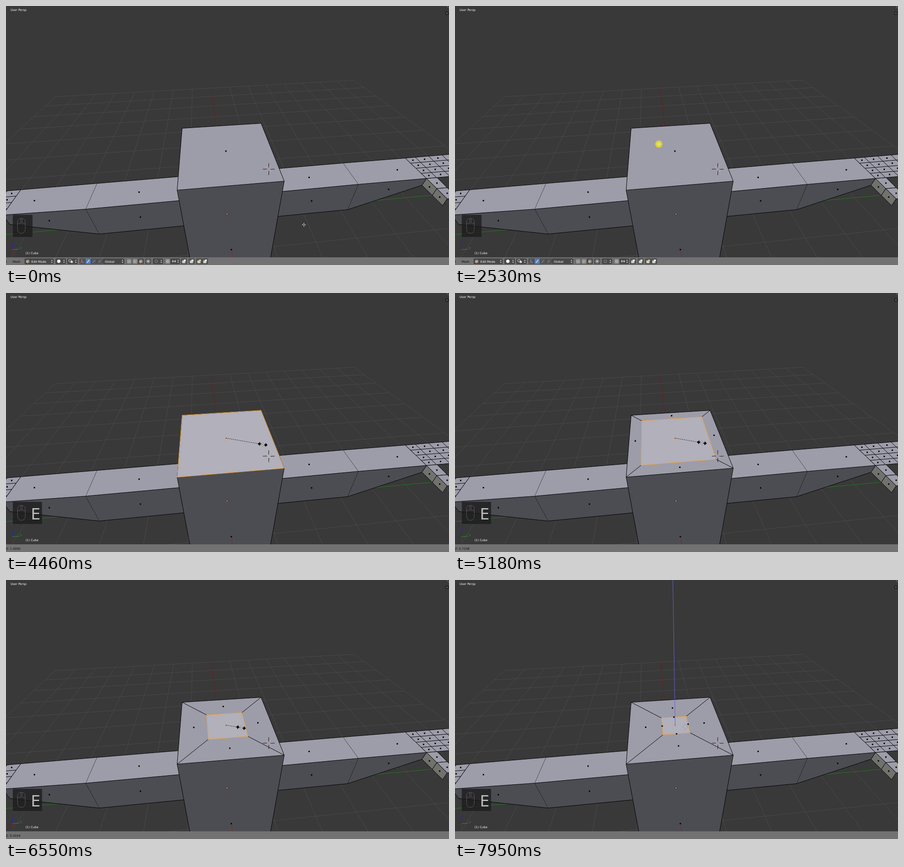
An HTML page with a canvas for the animation above (8000 ms loop, 977 by 573 pixels).

```html
<!DOCTYPE html>
<html>
<head>
<meta charset="utf-8">
<style>
html, body { margin: 0; width: 100%; height: 100%; overflow: hidden; background: #393939; }
canvas { display: block; }
</style>
</head>
<body>
<canvas id="stage" width="977" height="573"></canvas>
<script>
const ctx = document.getElementById('stage').getContext('2d');
const LOOP = 8000;
const TOP = '#9d9ca9', FRONT = '#4c4d52', SIDE = '#71716e', ORANGE = '#f0a12e';

// ---- drawing helpers; points are [x, y] ----
function path(pts, closed) {
  ctx.beginPath();
  pts.forEach(p => ctx.lineTo(...p));
  if (closed) ctx.closePath();
}
function stroke(color = '#000', width = 1) {
  ctx.strokeStyle = color;
  ctx.lineWidth = width;
  ctx.stroke();
}
function line(pts, color, width) { path(pts); stroke(color, width); }
function fill(pts, color) { path(pts, true); ctx.fillStyle = color; ctx.fill(); }
function disc(x, y, r, color) {
  ctx.beginPath();
  ctx.arc(x, y, r, 0, 7);
  ctx.fillStyle = color;
  ctx.fill();
}
function ring(x, y, r, color, width) {
  ctx.beginPath();
  ctx.arc(x, y, r, 0, 7);
  stroke(color, width);
}
function rect(x, y, w, h, color, radius = 0) {
  ctx.fillStyle = color;
  ctx.beginPath();
  ctx.roundRect(x, y, w, h, radius);
  ctx.fill();
}
function text(str, x, y, color = '#fff', size = 6.6) {
  ctx.font = size + 'px "DejaVu Sans", sans-serif';
  ctx.fillStyle = color;
  ctx.fillText(str, x, y);
}
function dashed(pattern, drawing) {
  ctx.setLineDash(pattern);
  drawing();
  ctx.setLineDash([]);
}
const dot = ([x, y], color = '#000') => rect(x - 1.5, y - 1.5, 3, 3, color);
const add = (p, x, y) => [p[0] + x, p[1] + y];
const mix = (p, q, k) => p.map((v, i) => v + (q[i] - v) * k);
const mean = pts => [0, 1].map(i => pts.reduce((sum, p) => sum + p[i], 0) / pts.length);

// ---- perspective maps ----
function floor(u, v) {
  const w = 1 + 0.01108 * u - 0.129 * v;
  return [(487 + 88.5 * u - 53.9 * v) / w, (460 - 2.6 * u + 11.5 * v) / w];
}
// Top of the cube: u to the right, v to the front, both from -1 to 1.
function lid(u, v) {
  const a = (u + v) / 2, b = (u - v) / 2, w = 1 - 0.137 * a + 0.1686 * b;
  return [(485.1 + 44 * a + 171.7 * b) / w, (320.5 + 13.5 * a - 17.8 * b) / w];
}
const CORNERS = [[-1, -1], [1, -1], [1, 1], [-1, 1]];
const SIDES = [[0, -1], [1, 0], [0, 1], [-1, 0]];
const CENTER = [485, 321];
const lidSquare = s => CORNERS.map(([u, v]) => lid(u * s, v * s));

// ---- scene ----
function drawGrid() {
  for (let i = -8; i <= 8; i++) {
    line([floor(i, -8), floor(i, 5)], i ? '#494949' : '#701c1c');
    if (i < 4) line([floor(-8, i), floor(8, i)], i ? '#494949' : '#1f7a1f');
  }
}

// An arm runs through cross-sections, each given as back, front and bottom point.
// The wrist edge is cut into four, so its points weigh five times in the last top face.
function drawArm(...sections) {
  const wrist = sections.at(-1);
  for (let i = 1; i < sections.length; i++) {
    const a = sections[i - 1], b = sections[i];
    const top = [a[0], b[0], b[1], a[1]], front = [a[1], b[1], b[2], a[2]];
    fill(top, TOP);
    fill(front, FRONT);
    for (let k = 0; k < 3; k++) line([a[k], b[k]]);
    line(b);
    const mid = mix(b[0], b[1], 0.5);
    dot(b === wrist ? mean([a[0], a[1], mid, mid, mid, mid, mid]) : mean(top));
    dot(mean(front));
  }
}

function drawHand(back, front, first, step) {
  const cell = (i, j) => {
    const reach = i && first + (i - 1) * step;
    return add(mix(back, front, j / 4), reach, -0.085 * reach);
  };
  fill([cell(0, 0), cell(4, 0), cell(4, 4), cell(0, 4)], TOP);
  for (let i = 0; i <= 4; i++) {
    line([cell(i, 0), cell(i, 4)]);
    line([cell(0, i), cell(4, i)]);
  }
  for (let i = 0; i < 4; i++)
    for (let j = 0; j < 4; j++)
      dot(mean([cell(i, j), cell(i + 1, j), cell(i, j + 1), cell(i + 1, j + 1)]));
}

function drawThumb(edge, bottom) {
  for (let k = 0; k < 2; k++) {
    const at = (p, n) => add(p, 22.7 * n, 22.5 * n);
    const side = [at(edge, k), at(edge, k + 1), at(bottom, k + 1), at(bottom, k)];
    const top = [side[0], side[1], add(side[1], 23, -2), add(side[0], 23, -2)];
    for (const [face, color] of [[top, TOP], [side, SIDE]]) {
      fill(face, color);
      path(face, true);
      stroke();
      dot(mean(face));
    }
  }
}

function drawArms() {
  const leftWrist = [[32, 406], [-8, 462], [8, 483]];
  const rightWrist = [[880, 336], [927, 381], [917, 396]];
  drawArm([[393, 376], [404, 428], [400, 485]], [[200, 392], [175, 449], [205, 504]], leftWrist);
  drawHand(leftWrist[0], leftWrist[1], -30, -30);
  drawArm([[566, 362], [586, 412], [578, 467]], [[743, 347], [777, 394], [753, 450]], rightWrist);
  drawThumb(rightWrist[1], rightWrist[2]);
  drawHand(rightWrist[0], rightWrist[1], 22, 29.5);
}

const stipple = (() => {
  const tile = document.createElement('canvas');
  tile.width = tile.height = 2;
  const t = tile.getContext('2d');
  t.fillStyle = 'rgba(255,255,255,.42)';
  t.fillRect(0, 0, 1, 1);
  t.fillRect(1, 1, 1, 1);
  return ctx.createPattern(tile, 'repeat');
})();

function drawCube(s, selected, extruded) {
  const rim = lidSquare(1);
  const front = [rim[3], rim[2], [580, 573], [408, 573]];
  fill(front, FRONT);
  fill(rim, TOP);
  line([front[3], rim[3], rim[0], rim[1], rim[2], front[2]]);
  if (s < 1 || !selected) line([rim[2], rim[3]]);
  line([floor(0, 1), floor(0, 1.2)], '#8a2626');
  dot([496.5, 538.5]);
  disc(487, 459.5, 2.2, '#201008');
  disc(487, 459.5, 1.5, '#f0a070');
  if (!selected) return dot([484.5, 320.5]);
  if (s < 1) {
    CORNERS.forEach(([u, v]) => line([lid(u, v), lid(u * s, v * s)]));
    SIDES.forEach(([u, v]) => dot(lid(u * (1 + s) / 2, v * (1 + s) / 2)));
  }
  fill(lidSquare(s), stipple);
  path(lidSquare(s), true);
  stroke(ORANGE);
  if (extruded) SIDES.forEach(([u, v]) => dot(lid(u * s, v * s)));
  dot(CENTER, '#f07a18');
}

function drawCursor3D() {
  const [x, y] = [579, 360.5];
  ring(x, y, 6.5, '#d0c8cc', 0.9);
  dashed([2.5, 4.3], () => ring(x, y, 6.5, '#a05050', 0.9));
  for (const d of [-1, 1]) {
    line([[x + 4 * d, y], [x + 13 * d, y]], '#151515');
    line([[x, y + 4 * d], [x, y + 13 * d]], '#151515');
  }
}

function drawGizmo() {
  ring(...CENTER, 10, '#eee');
  for (const [dx, dy, color] of [[-0.5, -45, '#0000e0'], [54, -4, '#00dc00'], [6, 38, '#e60000']]) {
    const len = Math.hypot(dx, dy), nx = dx / len, ny = dy / len;
    const tip = add(CENTER, dx, dy), base = add(tip, -11 * nx, -11 * ny);
    line([add(CENTER, 11 * nx, 11 * ny), base], color, 1.2);
    fill([tip, add(base, -3.7 * ny, 3.7 * nx), add(base, 3.7 * ny, -3.7 * nx)], color);
  }
}

function drawPointer(x, y, scaling, clicked) {
  if (clicked) disc(x, y, 8, '#d9d338');
  if (scaling) {
    dashed([2, 2], () => line([CENTER, [x, y]], '#111'));
    ctx.save();
    ctx.translate(x, y);
    ctx.rotate(Math.atan2(14, 81));
    for (const d of [-1, 1]) {
      fill([[11 * d, 0], [6 * d, -4.5], [6 * d, 4.5]], '#000');
      line([[3 * d, 0], [7 * d, 0]], '#000', 2.5);
    }
    ctx.restore();
  }
  const outline = ['rgba(20,20,20,.5)', 2.4, 4.5], core = ['#fff', 1.2, 4];
  for (const [color, width, end] of clicked ? [core] : [outline, core])
    for (const d of [-1, 1]) {
      line([[x + d, y], [x + end * d, y]], color, width);
      line([[x, y + d], [x, y + end * d]], color, width);
    }
}

function drawKeys(button, key) {
  rect(15, 462, key ? 64.5 : 43.5, 49, 'rgba(25,25,25,.72)', 1);
  if (button === 'left') rect(27, 471, 6, 8, '#a8a8a8', [4, 0, 0, 0]);
  if (button === 'right') rect(35, 471, 6, 8, '#a8a8a8', [0, 4, 0, 0]);
  ctx.beginPath();
  ctx.roundRect(25.5, 470, 17, 33, [7, 7, 8.5, 8.5]);
  ctx.moveTo(25.5, 482);
  ctx.quadraticCurveTo(34, 478, 42.5, 482);
  for (const x of [32.5, 35.5]) {
    ctx.moveTo(x, 470);
    ctx.lineTo(x, 479);
  }
  stroke('#646464', 0.8);
  if (key) text('E', 55, 501, '#bdbdbd', 33);
}

function drawLabels() {
  text('User Persp', 10, 11);
  text('(1) Cube', 43, 549);
  const origin = [14, 539];
  const axes = [['x', 0, 3, '#a02020', -2, 9], ['y', 15, -1, '#1f9c1f', 17, -2], ['z', 0, -13, '#2222b8', 1, -15]];
  for (const [name, dx, dy, color, tx, ty] of axes) {
    line([origin, add(origin, dx, dy)], color, 1.2);
    text(name, ...add(origin, tx, ty), color, 7);
  }
  disc(972.5, 16, 4, '#222');
  line([[970.5, 16], [974.5, 16]], '#777');
  line([[972.5, 14], [972.5, 18]], '#777');
  line([[972, 0], [977, 5]], '#888');
}

// ---- header bar ----
const MID = 564.8;
function button(x, w = 13, color = '#555') {
  rect(x, 558.5, w, 12.5, '#383838', 2.5);
  rect(x + 0.6, 559.1, w - 1.2, 11.3, color, 2);
}
function menu(x, w, label = '', labelX = 0) {
  button(x, w, '#484848');
  text(label, labelX, 567.5);
  for (const d of [-1, 1]) {
    const tip = [x + w - 4, MID + 3.6 * d];
    fill([tip, add(tip, -1.8, -2.4 * d), add(tip, 1.8, -2.4 * d)], '#ddd');
  }
}
function cubeIcon(x, color) {
  fill([[x - 3.5, 563], [x, 561], [x + 3.5, 563], [x + 3.5, 567], [x, 569], [x - 3.5, 567]], '#999');
  fill([[x - 3.5, 563], [x, 565], [x, 569], [x - 3.5, 567]], color);
}
function drawToolbar() {
  text('d', -2.5, 567.5, '#111');
  text('Mesh', 14.5, 567.5, '#0c0c0c');
  menu(41, 64, 'Edit Mode', 56);
  cubeIcon(48, '#e0a860');
  menu(109, 23);
  disc(116.5, MID, 3.8, '#eee');
  menu(135, 23);
  ring(141, 563.5, 2.8, '#ddd');
  disc(145, 566, 2.5, '#ddd');

  for (let i = 0; i < 4; i++) {
    const x = 162 + 12.7 * i;
    button(x, 13, i === 1 ? '#5680c2' : '#555');
    if (i) line([[x + 4, 568], [x + 9, 562]], i === 1 ? '#eee' : '#6888b8', 1.2);
  }
  line([[167, 560.5], [167, 566], [172, 568]], '#60a0c0', 1.2);
  line([[167, 566], [164, 569]], '#d04040', 1.2);
  menu(213.5, 47.5, 'Global', 218);

  for (let i = 0; i < 3; i++) {
    button(265 + 13 * i, 13, i < 2 ? '#858585' : '#555');
    cubeIcon(271.5 + 13 * i, i < 2 ? '#a4a4a4' : '#e8a060');
  }
  button(307);
  dashed([1, 1], () => ring(313.5, MID, 4, '#eee'));
  rect(311.5, 562.8, 4, 4, '#ccc');
  menu(324, 22.5);
  ring(331.5, MID, 3, '#999');
  button(350, 13, '#858585');
  rect(353, 561.5, 7, 7, '#a4a4a4', 2);
  menu(363, 20.5);
  line([[366, MID], [375, MID]], '#eee');
  for (const x of [368, 373]) line([[x, 562], [x, 567.5]], '#eee');
  for (const x of [386, 403, 419.5, 432.5]) {
    button(x);
    rect(x + 2.5, 563, 7, 6, '#ccc', 1);
    rect(x + 6, 561, 4.5, 3.5, x === 419.5 ? '#e0c070' : '#eee');
  }
}

// ---- timing ----
const POINTER = [
  [0, 657, 484], [680, 419, 276], [1180, 449.5, 305.5],
  [3179, 449.5, 305.5], [3180, 557, 333], [3380, 566, 335]
];
const SCALE = [[4640, 1], [5180, 0.7338], [5480, 0.57], [5880, 0.5013], [6780, 0.365], [6980, 0.2854]];
const linear = p => p;
const smooth = p => p * p * (3 - 2 * p);
const during = (t, from, to) => t >= from && t < to;

function track(keys, t, ease) {
  const next = keys.findIndex(k => k[0] > t);
  if (next < 1) return keys.at(next).slice(1);
  const a = keys[next - 1], b = keys[next];
  return mix(a, b, ease((t - a[0]) / (b[0] - a[0]))).slice(1);
}

function draw(t) {
  const step = Math.max(0, Math.floor((t - 80) / 100) * 100 + 80);
  const [s] = track(SCALE, step, linear);
  const pointer = t < 4460 ? track(POINTER, step, smooth) : add(CENTER, 81 * s, 14 * s);
  const selected = t >= 2640;
  const extruding = during(t, 3750, 4460) || t >= 7950;
  const scaling = during(t, 4460, 7380);
  const pressed = during(t, 2640, 4200) ? 'right' : during(t, 7380, 7950) ? 'left' : '';

  rect(0, 0, 977, 573, '#393939');
  ctx.save();
  ctx.translate(0.5, 0.5);
  drawGrid();
  drawArms();
  drawCube(s, selected, extruding);
  if (extruding) line([[480, 0], CENTER], '#6262d2');
  if (selected && !extruding && !scaling) drawGizmo();
  drawCursor3D();
  ctx.restore();
  drawKeys(pressed, during(t, 3750, 7200) || t >= 7950);
  drawLabels();
  rect(0, 556, 977, 17, '#727272');
  if (scaling) text('Z: ' + s.toFixed(4), 0, 567.5, '#0c0c0c');
  else if (!extruding) drawToolbar();
  drawPointer(...pointer, scaling, during(t, 2530, 2820) || during(t, 7380, 7570));
}

let start;
function tick(now) {
  start ??= now;
  draw((now - start) % LOOP);
  requestAnimationFrame(tick);
}
requestAnimationFrame(tick);
</script>
</body>
</html>
```
